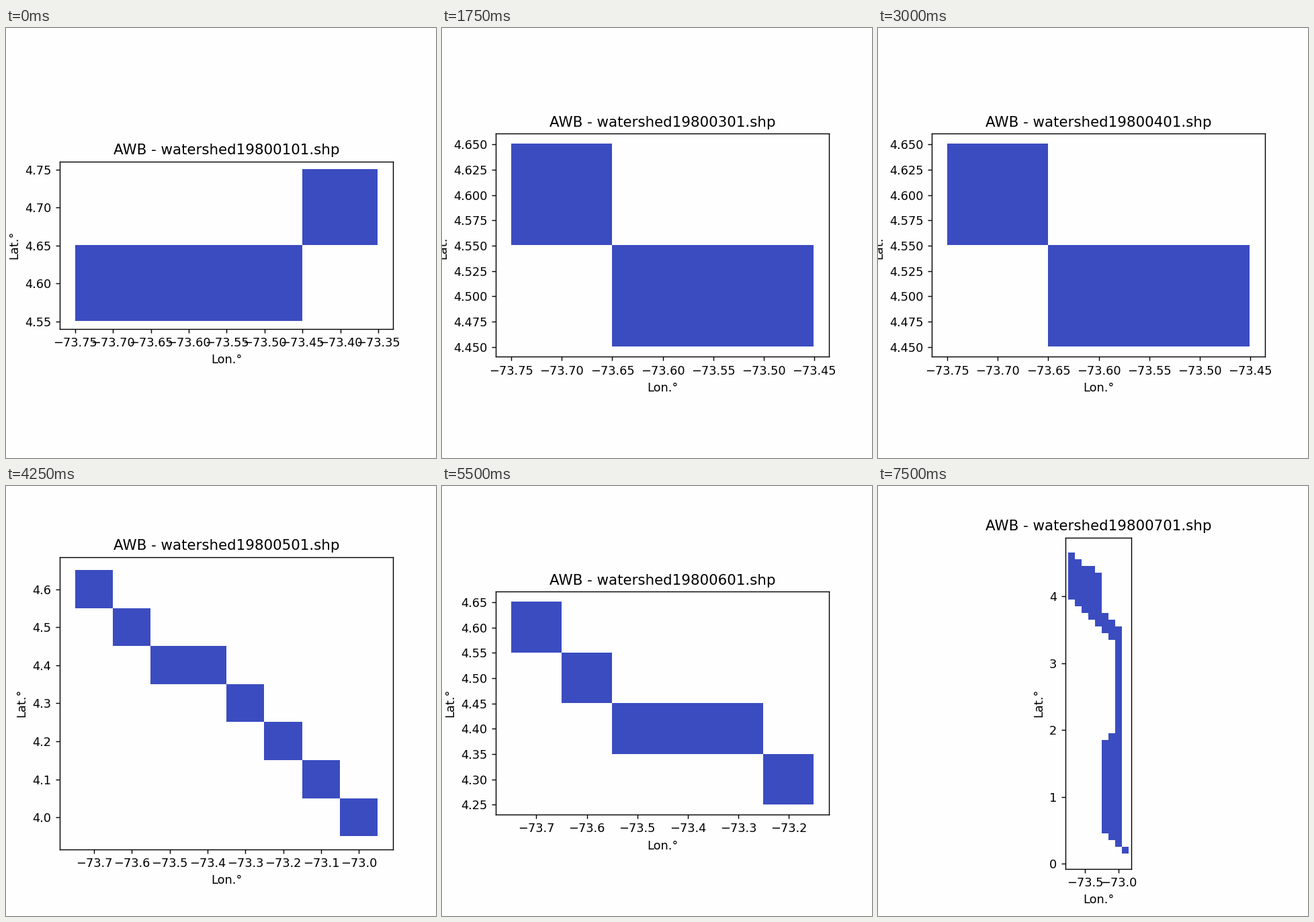
A matplotlib script for the animation above (8000 ms loop, 640 px wide and 640 px high).

```python
import math

import matplotlib.pyplot as plt
from matplotlib.animation import FuncAnimation
from matplotlib.patches import Rectangle

CELL = 0.1                      # grid size in degrees
WEST, NORTH = -73.7504, 4.6505  # corner of the grid's first cell
BLUE = "#3b4cc0"
PAPER = "#fefefe"

plt.rcParams["font.family"] = "DejaVu Sans"
fig, ax = plt.subplots(figsize=(5, 5), dpi=128, facecolor=PAPER)


def trail(*runs, step=1):
    """Rows of cells as (col, row, width, height), each starting where the last ended."""
    blocks, col = [], 0
    for i, run in enumerate(runs):
        blocks.append((col, i * step, run, 1))
        col += run
    return blocks


def basin():
    """A slanted band, a straight channel south, a lower lobe and an outlet."""
    def column(col, top, bottom):
        return col, top, 1, bottom - top

    band = [column(c, c - (c > 2) if c < 5 else c + 4, c + 7) for c in range(8)]
    lobe = [column(c, 33 - c, c + 37) for c in range(5, 8)]
    return band + lobe + [column(7, 11, 44), column(8, 44, 45)]


MONTHS = [
    trail(3, 1, step=-1),
    trail(3),
    trail(1, 2),
    trail(1, 2),
    trail(1, 1, 2, 1, 1, 1, 1),
    trail(1, 1, 3, 1),
    basin(),
]


def padded(low, high):
    pad = 0.05 * (high - low)
    return low - pad, high + pad


def draw_month(index):
    blocks = MONTHS[index]
    ax.clear()
    ax.set_facecolor(PAPER)
    for col, row, width, height in blocks:
        corner = (WEST + col * CELL, NORTH - (row + height) * CELL)
        ax.add_patch(Rectangle(corner, width * CELL, height * CELL,
                               facecolor=BLUE, edgecolor="none"))
    east = WEST + CELL * max(c + w for c, _, w, _ in blocks)
    top = NORTH - CELL * min(r for _, r, _, _ in blocks)
    bottom = NORTH - CELL * max(r + h for _, r, _, h in blocks)
    ax.set_xlim(*padded(WEST, east))
    ax.set_ylim(*padded(bottom, top))
    ax.set_aspect(1 / math.cos(math.radians((top + bottom) / 2)))
    ax.set_title(f"AWB - watershed1980{index + 1:02d}01.shp")
    ax.set_xlabel("Lon.°")
    ax.set_ylabel("Lat.°")


def update(tick):
    # The first month is cut short: 2 ticks, then 5 ticks per month
    draw_month((tick + 3) // 5)
    return []


def reset():
    return update(0)


anim = FuncAnimation(fig, update, frames=32, init_func=reset,
                     interval=250, repeat=True, repeat_delay=0)
plt.show()
```
